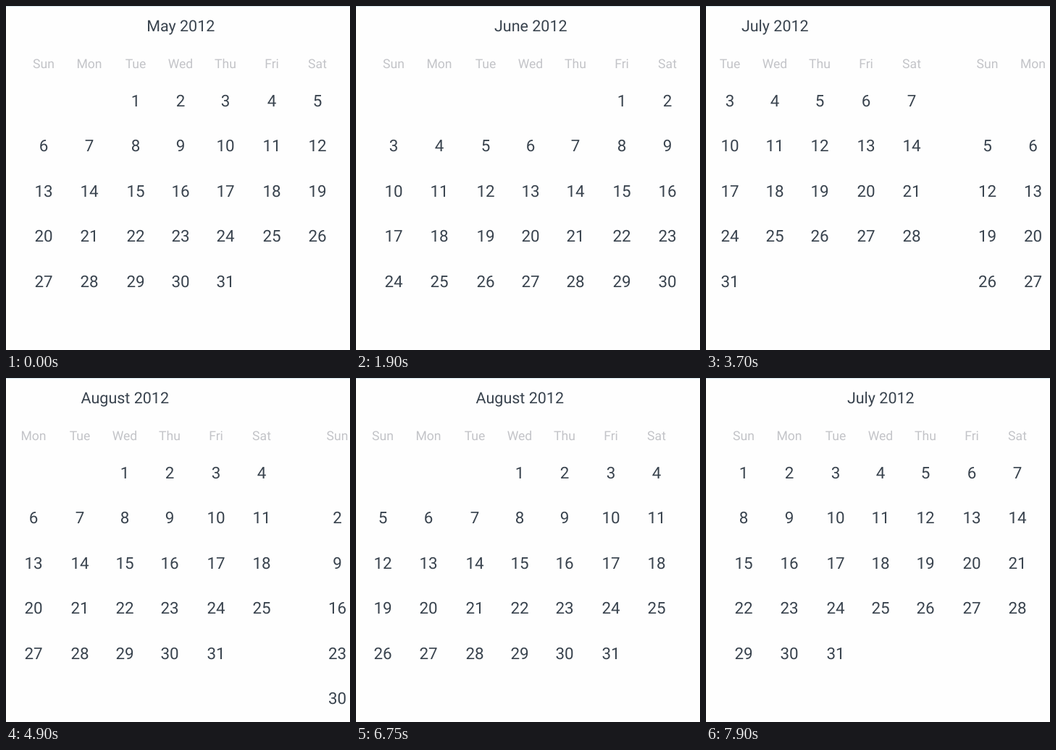
An HTML page for the animation above (8000 ms loop, 475x476 px).

```html
<!DOCTYPE html>
<html lang="en">
<head>
<meta charset="utf-8">
<title>Calendar</title>
<style>
  html, body { margin: 0; width: 100%; height: 100%; overflow: hidden; background: #fefefe; }
  svg { display: block; width: 475px; height: 476px; }
  text { font-family: Roboto, sans-serif; text-anchor: middle; fill: #39434e; text-rendering: geometricPrecision; }
  .title { font-size: 21.5px; }
  .name { font-size: 17.6px; fill: #c3c4c8; }
  .day { font-size: 22.4px; }
  .day.pressed { fill: #d2d3d5; }
</style>
</head>
<body>
<svg id="stage" viewBox="0 0 475 476">
  <rect width="475" height="476" fill="#fefefe"/>
  <g id="strip"></g>
  <line x1="0" y1="0.5" x2="475" y2="0.5" stroke="#d6e6ee"/>
</svg>
<script>
const LOOP = 8000, PAGE = 482.5, YEAR = 2012, FIRST = 4;
const MONTHS = ['May', 'June', 'July', 'August', 'September'];
const NAMES = ['Sun', 'Mon', 'Tue', 'Wed', 'Thu', 'Fri', 'Sat'];
const COLS = [52, 115, 179, 241, 303, 367, 430];
const strip = document.getElementById('strip');

function add(parent, tag, attrs, label) {
  const el = document.createElementNS('http://www.w3.org/2000/svg', tag);
  for (const key in attrs) el.setAttribute(key, attrs[key]);
  if (label !== undefined) el.textContent = label;
  parent.appendChild(el);
  return el;
}

// Returns the day labels of one month, indexed by date
function buildMonth(name, index) {
  const page = add(strip, 'g', { transform: `translate(${index * PAGE} 0)` });
  add(page, 'text', { class: 'title', x: 241.3, y: 35 }, `${name} ${YEAR}`);
  NAMES.forEach((label, i) => add(page, 'text', { class: 'name', x: COLS[i], y: 86 }, label));
  const start = new Date(YEAR, FIRST + index, 1).getDay();
  const count = new Date(YEAR, FIRST + index + 1, 0).getDate();
  const days = [];
  for (let d = 1; d <= count; d++) {
    const cell = start + d - 1;
    const y = 139 + Math.floor(cell / 7) * 62.4;
    days[d] = add(page, 'text', { class: 'day', x: COLS[cell % 7], y }, d);
  }
  return days;
}
const months = MONTHS.map(buildMonth);

// Each swipe: starting page, direction, then time and distance pairs
const SWIPES = [
  [0, 1, [[1100, 0], [1150, 6], [1250, 40], [1350, 115], [1450, 220], [1525, 345], [1600, 440], [1650, 470], [1700, PAGE]]],
  [1, 1, [[2300, 0], [2350, 5], [2450, 20], [2500, 34], [2650, 150], [2700, 255], [2750, 350], [2800, 420], [2850, 463], [2900, PAGE]]],
  [2, 1, [[3350, 0], [3400, 5], [3450, 26], [3550, 84], [3700, 146], [3800, 255], [3900, 377], [4000, 447], [4100, 476], [4150, PAGE]]],
  [3, 1, [[4700, 0], [4750, 8], [4900, 77], [5000, 130], [5100, 215], [5200, 330], [5300, 417], [5400, 463], [5500, PAGE]]],
  [4, -1, [[6100, 0], [6200, 18], [6300, 70], [6400, 165], [6500, 295], [6600, 400], [6700, 454], [6750, 467.5], [6800, 477], [6850, PAGE]]],
  [3, -1, [[7300, 0], [7350, 6], [7450, 60], [7550, 175], [7650, 325], [7750, 435], [7850, 476], [7900, PAGE]]]
];

// Fingertip contact: month, date, from, to
const TOUCHES = [[0, 25, 1000, 1150], [4, 25, 6100, 6150]];

function distance(keys, t) {
  const n = keys.findIndex(k => k[0] > t);
  if (n < 0) return PAGE;
  const [t0, d0] = keys[n - 1], [t1, d1] = keys[n];
  return d0 + (d1 - d0) * (t - t0) / (t1 - t0);
}

function scrollAt(t) {
  let pos = 0;
  for (const [page, dir, keys] of SWIPES) {
    if (t < keys[0][0]) break;
    pos = page * PAGE + dir * distance(keys, t);
  }
  return pos;
}

function draw(t) {
  strip.setAttribute('transform', `translate(${-scrollAt(t)} 0)`);
  for (const [month, date, from, to] of TOUCHES)
    months[month][date].classList.toggle('pressed', t >= from && t < to);
}

let origin;
function tick(now) {
  if (origin === undefined) origin = now;
  draw((now - origin) % LOOP);
  requestAnimationFrame(tick);
}
draw(0);
requestAnimationFrame(tick);
</script>
</body>
</html>
```
